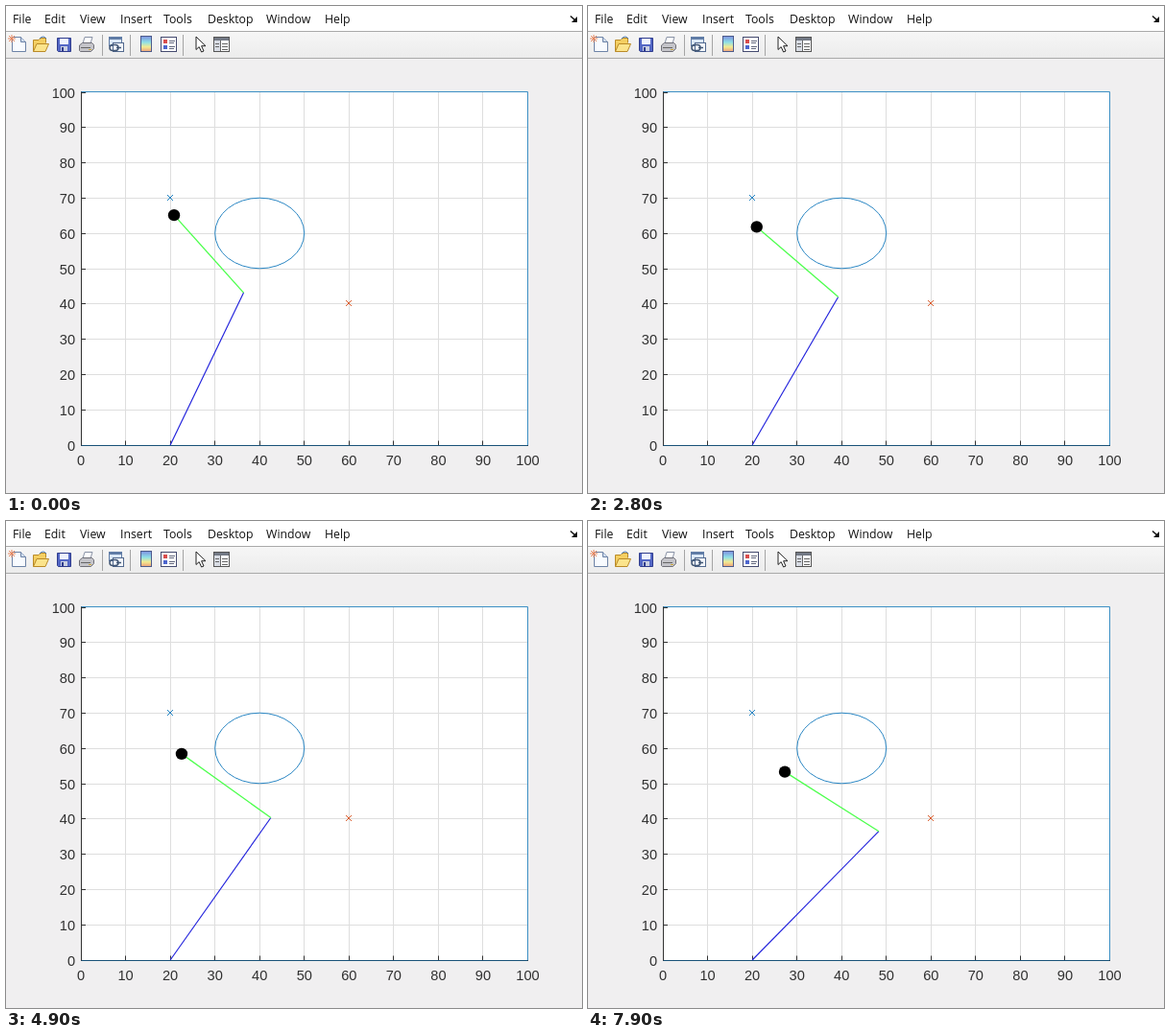
An HTML page that plays this animation: 600x508 px, repeating every 8000 ms.

```html
<!DOCTYPE html>
<html lang="en">
<head>
<meta charset="utf-8">
<title>Two-link arm</title>
<style>
html, body { margin: 0; width: 100%; height: 100%; overflow: hidden; background: #f0eff0; }
svg { display: block; width: 600px; height: 508px; }
.menu { font: 12.3px "Open Sans", "Noto Sans", sans-serif; fill: #111; }
.ticks { font: 14.6px "Liberation Sans", Arial, sans-serif; fill: #303030; }
.end { text-anchor: end; }
.mid { text-anchor: middle; }
.line { fill: none; stroke-width: 1; }
</style>
</head>
<body>
<svg viewBox="0 0 600 508">
  <defs>
    <linearGradient id="bar" x1="0" y1="0" x2="0" y2="1">
      <stop offset="0" stop-color="#f6f6f6"/><stop offset="1" stop-color="#ececec"/>
    </linearGradient>
    <linearGradient id="rainbow" x1="0" y1="0" x2="0" y2="1">
      <stop offset="0" stop-color="#7d8fe0"/><stop offset=".4" stop-color="#8ee0e6"/>
      <stop offset=".7" stop-color="#f3eb91"/><stop offset="1" stop-color="#eda07c"/>
    </linearGradient>
    <path id="pointer" d="M0 0V13.5L3.2 10.6L5.6 16L8 15L5.6 9.7H10Z" fill="#fff" stroke="#222"/>
  </defs>

  <rect width="600" height="508" fill="#f0eff0"/>
  <rect width="600" height="26" fill="#fff"/>
  <rect y="27" width="600" height="27" fill="url(#bar)"/>
  <path class="line" d="M0 26.5H600M0 54.5H600" stroke="#a9a9a9"/>
  <g id="menu" class="menu"></g>
  <path d="M588 10.5L592.5 14.5" stroke="#111" stroke-width="1.5"/>
  <path d="M595 11V17H589Z" fill="#111"/>

  <g id="icons" stroke-width="1">
    <path d="M6.500 32.500H15.500L20.500 37.500V47.500H6.500Z" fill="#f8fbff" stroke="#6d83a6"/>
    <path d="M15.500 32.500V37.500H20.500" fill="#cfdcee" stroke="#6d83a6"/>
    <path d="M3 31L9 37M9 31L3 37M6 30V38M2 34H10" stroke="#e8865c"/>
    <path d="M28.500 47.500V35.500H34L36 33.500H41.500V38.500" fill="#f4cf62" stroke="#b98a28"/>
    <path d="M28.500 47.500L32 39.500H44.500L41 47.500Z" fill="#fbe48c" stroke="#b98a28"/>
    <path d="M35 34Q39 30 42 34" fill="none" stroke="#4a7ab5"/>
    <path d="M53.500 33.500H67.500V47.500H54.500L53.500 46.500Z" fill="#5367c5" stroke="#2f3c8d"/>
    <rect x="56" y="34" width="9" height="6" fill="#eef2ff"/>
    <rect x="57" y="42" width="7" height="5" fill="#c9cfe2"/>
    <rect x="58" y="43" width="2" height="4" fill="#2f3c8d"/>
    <path d="M80 39L82 32.500H90L88 39Z" fill="#fff" stroke="#8a93a6"/>
    <path d="M76.500 41L79.500 38.500H89.500L91.500 40.500V44.500L88.500 47.500H77.500L76.500 46.500Z" fill="#c4c4c9" stroke="#707078"/>
    <path d="M78 43.500H88" stroke="#666"/>
    <path d="M86 45.500H89" stroke="#c9a63c"/>
    <rect x="107.500" y="32.500" width="13" height="9" fill="#dce9f8" stroke="#607ca6"/>
    <rect x="107" y="32" width="14" height="3" fill="#607ca6"/>
    <rect x="111.500" y="38.500" width="11" height="9" fill="#f3f7fc" stroke="#52698e"/>
    <path d="M108 43.500Q108 40.500 111 40.500H114Q117 40.500 117 43.500T114 46.500H111Q108 46.500 108 43.500M115 43.500H120" fill="none" stroke="#405573" stroke-width="1.5"/>
    <rect x="140.500" y="31.500" width="11" height="16" fill="url(#rainbow)" stroke="#4d5b8a"/>
    <rect x="161.500" y="32.500" width="16" height="15" fill="#fff" stroke="#454b70"/>
    <rect x="164" y="35" width="4" height="4" fill="#d94d4d"/>
    <rect x="164" y="41" width="4" height="4" fill="#4c65ce"/>
    <path d="M170 36.500H176M170 38.500H175M170 42.500H176M170 44.500H175" stroke="#62677d"/>
    <use href="#pointer" x="198" y="32"/>
    <rect x="216.500" y="32.500" width="16" height="15" fill="#fff" stroke="#555"/>
    <rect x="217" y="33" width="15" height="3" fill="#737985"/>
    <rect x="217" y="36" width="6" height="11" fill="#d8dce4"/>
    <path d="M223.500 36V47M218 39.500H222M218 42.500H222M225 39.500H231M225 42.500H231M225 45.500H231" stroke="#666"/>
    <path d="M100.500 30V52M129.500 30V52M184.500 30V52" stroke="#a5a5a5"/>
  </g>

  <rect x="78" y="90" width="466" height="368" fill="#fff"/>
  <path id="grid" class="line" stroke="#dedede"/>
  <g id="labels" class="ticks"></g>
  <path id="axes" class="line" stroke="#333"/>
  <path class="line" d="M78.500 89.500H543.500V458" stroke="#3d8fc4"/>
  <path class="line" d="M78.500 458.500H543.500" stroke="#0072bd" opacity=".5"/>
  <ellipse class="line" cx="264.200" cy="237" rx="46.500" ry="36.800" stroke="#2b87c4"/>
  <path class="line" d="M168 197L174 203M174 197L168 203" stroke="#1f82c2"/>
  <path class="line" d="M354 307L360 313M360 307L354 313" stroke="#d95f30"/>

  <path id="upper" class="line" stroke="#2222dc" style="stroke-width:1.15"/>
  <path id="fore" class="line" stroke="#4cff4c" style="stroke-width:1.300"/>
  <circle id="hand" r="6.200" fill="#000"/>
  <use id="cursor" href="#pointer"/>
</svg>
<script>
const LOOP = 8000, STEP = 100;
const UPPER = 46.2, FORE = 26.95;
// time, shoulder angle, forearm angle (degrees)
const POSES = [
  [0, 69.18, 54.7], [1200, 66.94, 52.2], [2800, 65.39, 47.4], [4100, 63.03, 43.6],
  [5800, 58.39, 40.65], [6700, 55.66, 39.6], [7900, 52.19, 38.7]
];
const CURSOR = [[1000, 186, -17], [1200, 188, 1], [1700, 188, 1], [2000, 190, -18]];

const el = id => document.getElementById(id);
const px = x => 78 + x * 4.655;
const py = y => 458 - y * 3.68;
const crisp = v => Math.floor(v) + 0.5;
const rad = deg => deg * Math.PI / 180;

function addText(parent, text, x, y, cls = "") {
  const node = document.createElementNS("http://www.w3.org/2000/svg", "text");
  node.setAttribute("x", x);
  node.setAttribute("y", y);
  node.setAttribute("class", cls);
  node.textContent = text;
  parent.append(node);
}

function sample(keys, t) {
  if (t <= keys[0][0]) return keys[0].slice(1);
  const i = keys.findIndex(k => k[0] > t);
  if (i < 0) return keys[keys.length - 1].slice(1);
  const a = keys[i - 1], b = keys[i], u = (t - a[0]) / (b[0] - a[0]);
  return a.slice(1).map((v, n) => v + (b[n + 1] - v) * u);
}

function buildStage() {
  const menu = { File: 7, Edit: 40, View: 77, Insert: 119, Tools: 164, Desktop: 210, Window: 271, Help: 332 };
  for (const [name, x] of Object.entries(menu)) addText(el("menu"), name, x, 18);

  let grid = "", axes = "M78.5 89V458.5H544";
  for (let v = 0; v <= 100; v += 10) {
    const x = crisp(px(v)), y = crisp(py(v));
    if (v > 0 && v < 100) grid += `M${x} 90V458M79 ${y}H543`;
    axes += `M${x} 458V453.5M78 ${y}H83`;
    addText(el("labels"), v, px(v), 479, "mid");
    addText(el("labels"), v, 72, py(v) + 5.5, "end");
  }
  el("grid").setAttribute("d", grid);
  el("axes").setAttribute("d", axes);
}

function draw(t) {
  const [shoulder, fore] = sample(POSES, t).map(rad);
  const ex = 20 + UPPER * Math.cos(shoulder), ey = UPPER * Math.sin(shoulder);
  const hx = px(ex - FORE * Math.cos(fore)), hy = py(ey + FORE * Math.sin(fore));
  const elbow = `${px(ex)} ${py(ey)}`;
  el("upper").setAttribute("d", `M${px(20)} 458L${elbow}`);
  el("fore").setAttribute("d", `M${elbow}L${hx} ${hy}`);
  el("hand").setAttribute("cx", hx);
  el("hand").setAttribute("cy", hy);
  el("cursor").setAttribute("transform", `translate(${sample(CURSOR, t).join(" ")})`);
}

function frame(now) {
  draw(Math.floor((now - start) % LOOP / STEP) * STEP);
  requestAnimationFrame(frame);
}

buildStage();
draw(0);
const start = performance.now();
requestAnimationFrame(() => frame(performance.now()));
</script>
</body>
</html>
```
